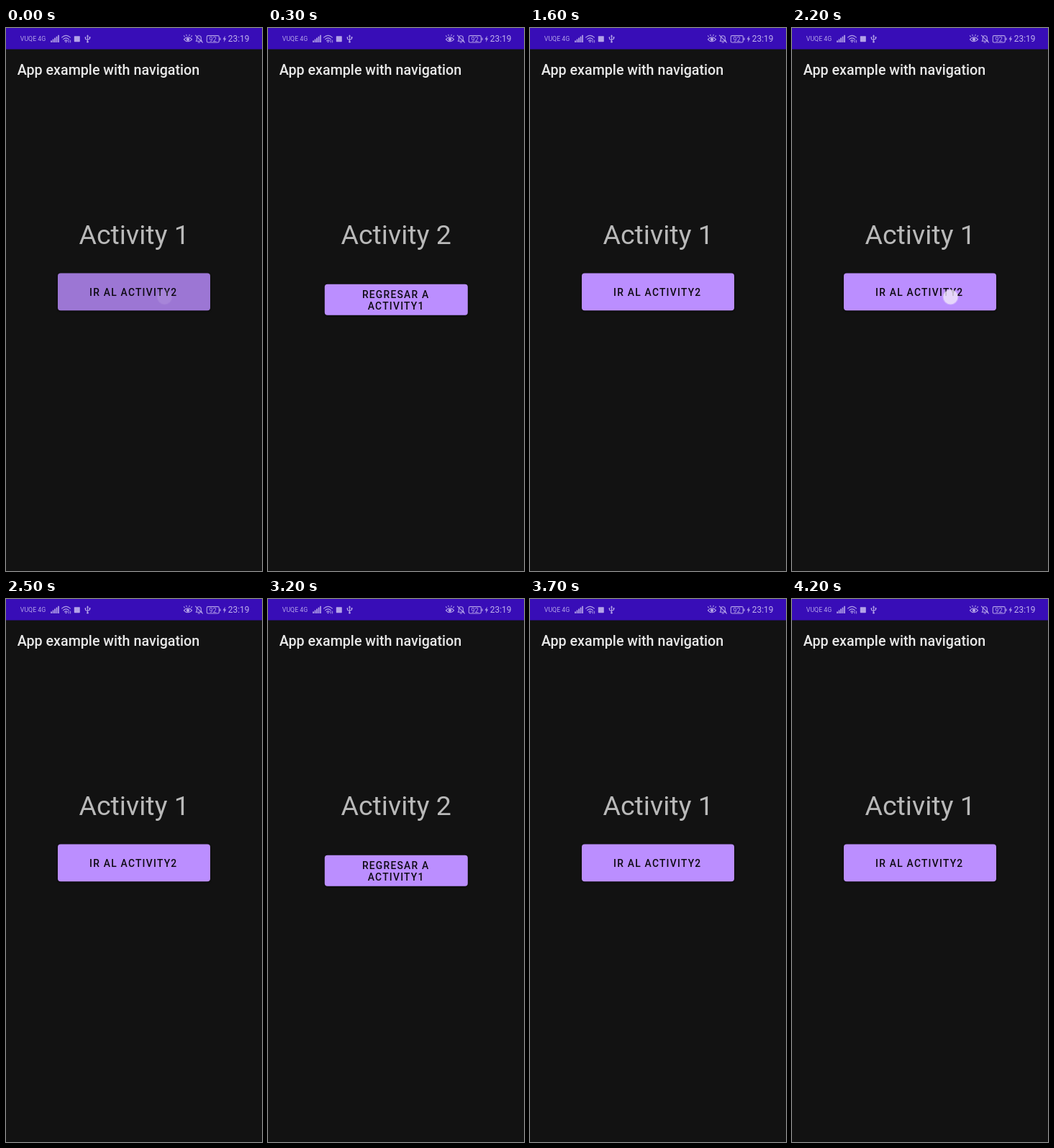
An HTML page for the animation above (4300 ms loop, 356 by 754 pixels).

```html
<!DOCTYPE html>
<html lang="en">
<head>
<meta charset="utf-8">
<title>App example with navigation</title>
<style>
  html, body { margin: 0; width: 100%; height: 100%; overflow: hidden; background: #121212; }
  svg { display: block; width: 100%; height: 100%; font-family: Roboto, sans-serif; }
  .heading { font-size: 37.6px; fill: #b9b9b9; }
  .label { font-size: 13.85px; font-weight: 500; letter-spacing: 0.0893em; fill: #0d0a12; }
  .face { fill: #bb8eff; filter: drop-shadow(0 1px 1.5px rgba(0, 0, 0, .6)); }
  .line { fill: none; stroke: #b3a2e8; stroke-width: 1.1; stroke-linecap: round; stroke-linejoin: round; }
</style>
</head>
<body>
<svg viewBox="0 0 356 754">
  <rect width="356" height="754" fill="#121212"/>
  <rect width="356" height="29.5" fill="#380db7"/>

  <g id="status" fill="#b3a2e8">
    <text x="19.8" y="18.4" font-size="8.8">VUQE 4G</text>
    <g id="bars"></g>
    <g class="line">
      <path d="M77.6 13.2Q83.5 7.6 89.4 13.2M79.6 15.6Q83.5 12 87.4 15.6M81.6 17.8Q83.5 16 85.4 17.8"/>
      <path d="M87.2 17v3M89.6 20v-3" stroke-width=".9"/>
    </g>
    <circle cx="83.5" cy="19.3" r="1"/>
    <rect x="94.8" y="11.2" width="8" height="8" rx=".6"/>
    <path class="line" stroke-width="1" d="M113.5 11v8M110.5 13.2v2.1l3 1.8M116.5 13v2l-3 1.6"/>
    <path d="M113.5 9.2l1.6 2.5h-3.2z"/>
    <circle cx="113.5" cy="19.3" r="1.3"/>
    <circle cx="110.5" cy="13.2" r="1"/>
    <rect x="115.5" y="12.2" width="2" height="2"/>
    <path class="line" d="M247.4 15.8Q253 9.8 258.6 15.8Q253 21.8 247.4 15.8ZM248.4 12l-.9-1.2M251.2 10.7l-.4-1.3M254.8 10.7l.4-1.3M257.6 12l.9-1.2"/>
    <circle cx="253" cy="15.8" r="2.2"/>
    <path class="line" d="M264.2 18.2h8.2l-1.1-1.7v-2.8q0-3-3-3t-3 3v2.8zM267.2 20h2.2M263.4 10.2l10 10"/>
    <rect class="line" x="279.3" y="10.6" width="17" height="9.4" rx="1.8" stroke-width="1"/>
    <path d="M297.3 13.6h1.2v3.4h-1.2z"/>
    <text x="282.6" y="18.5" font-size="9">92</text>
    <path d="M304.8 10.8l-3.2 5h2l-.7 4 3.3-5.2h-2z"/>
    <text x="308.8" y="19.4" font-size="11.9" fill="#c0b2ec">23:19</text>
  </g>

  <text x="15.8" y="65.3" font-size="19.7" font-weight="500" fill="#e8e8e8">App example with navigation</text>

  <g id="first">
    <text class="heading" x="101.4" y="300.3">Activity 1</text>
    <rect class="face" x="72" y="340.4" width="212" height="51.8" rx="4"/>
    <rect class="shade" x="72" y="340.4" width="212" height="51.8" rx="4"/>
    <text class="label" x="116" y="371.8">IR AL ACTIVITY2</text>
  </g>
  <g id="second">
    <text class="heading" x="101.4" y="300.3">Activity 2</text>
    <rect class="face" x="78.8" y="355.8" width="199" height="43" rx="4"/>
    <rect class="shade" x="78.8" y="355.8" width="199" height="43" rx="4"/>
    <text class="label" x="130.9" y="374.9">REGRESAR A</text>
    <text class="label" x="138.8" y="391.1">ACTIVITY1</text>
  </g>

  <g id="touch">
    <circle cx="220.5" cy="373.5" r="11" fill="#fff" opacity=".25"/>
    <circle cx="220.5" cy="373.5" r="10" fill="#f0e8fa" opacity=".72"/>
  </g>
</svg>
<script>
  const LOOP = 4300;
  const $ = id => document.getElementById(id);
  const shades = document.querySelectorAll('.shade');

  // [start ms, button darkening, touch dot strength]
  const presses = [
    [0, .17, .16], [100, 0, 0],
    [1100, 0, 1], [1200, .12, 1], [1300, .17, .16], [1400, 0, 0],
    [2200, 0, 1], [2300, .12, 1], [2400, .17, .16], [2500, 0, 0],
    [3300, .08, 1], [3400, .17, .16], [3500, 0, 0]
  ];
  const between = (t, a, b) => t >= a && t < b;

  for (let i = 0; i < 5; i++) {
    const bar = document.createElementNS('http://www.w3.org/2000/svg', 'rect');
    const height = 2.6 + i * 1.9;
    const box = { x: 62.2 + i * 2.5, y: 20 - height, width: 1.7, height };
    for (const key in box) bar.setAttribute(key, box[key]);
    $('bars').append(bar);
  }

  function draw(t) {
    const onSecond = between(t, 300, 1600) || between(t, 2700, 3700);
    $('first').style.display = onSecond ? 'none' : '';
    $('second').style.display = onSecond ? '' : 'none';
    const [, dark, dot] = presses.filter(p => p[0] <= t).pop();
    shades.forEach(s => s.setAttribute('opacity', dark));
    $('touch').setAttribute('opacity', dot);
  }

  const start = performance.now();
  function tick() {
    draw((performance.now() - start) % LOOP);
    requestAnimationFrame(tick);
  }
  tick();
</script>
</body>
</html>
```
